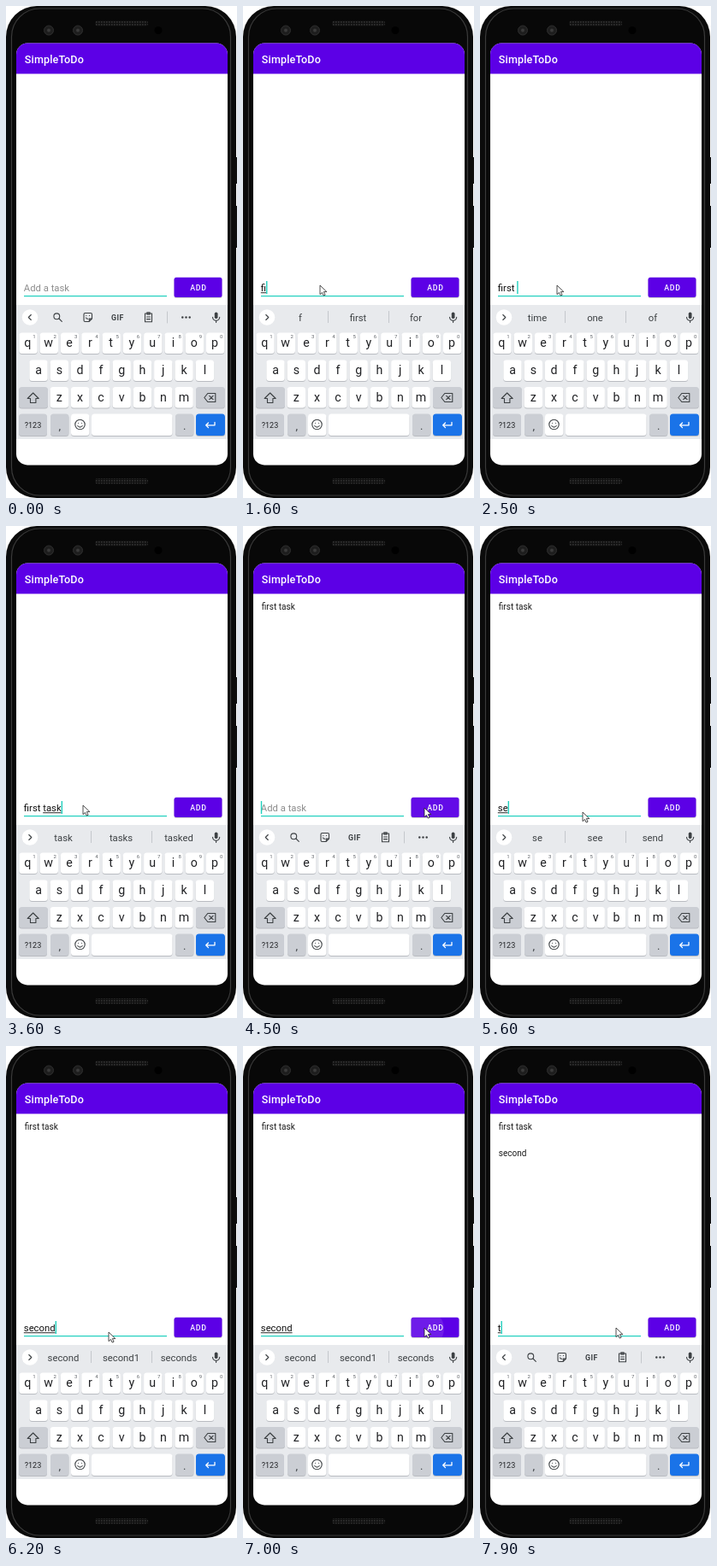
Recreate the animation shown at these times as an HTML page. Size 270 by 576 pixels, loop 8000 ms.

```html
<!DOCTYPE html>
<html lang="en">
<head>
<meta charset="utf-8">
<title>SimpleToDo</title>
<style>
html, body { margin: 0; width: 100%; height: 100%; overflow: hidden; background: #fff; }
svg { display: block; width: 270px; height: 576px; font-family: Roboto, sans-serif; }
.mid { text-anchor: middle; }
.icon { fill: none; stroke: #3c4043; stroke-width: 1.1; stroke-linecap: round; stroke-linejoin: round; }
.solid { fill: #3c4043; stroke: none; }
.item { font-size: 10.06px; fill: #1c1c1c; }
.entry { font-size: 11.3px; white-space: pre; }
</style>
</head>
<body>
<svg viewBox="0 0 270 576">
  <defs>
    <clipPath id="buttonClip"><rect x="196.500" y="317.700" width="56" height="23.300" rx="2.500"/></clipPath>
    <clipPath id="screenClip"><rect x="12" y="43.600" width="247" height="493.800" rx="13"/></clipPath>
    <pattern id="mesh" width="3" height="3" patternUnits="userSpaceOnUse">
      <rect width="3" height="3" fill="#101010"/><rect width="1.6" height="1.6" fill="#333"/>
    </pattern>
  </defs>

  <!-- phone -->
  <path d="M267.500 177h2.500v31h-2.500zM267.500 234h2.500v49h-2.500z" fill="#111"/>
  <rect x="0" y="0" width="269" height="576" rx="36" fill="#0b0b0b"/>
  <rect x="6.500" y="3" width="256" height="570" rx="33" fill="#080808" stroke="#3a3a3a" stroke-width="1.200"/>
  <rect x="104" y="17" width="62" height="6.500" rx="3" fill="url(#mesh)"/>
  <rect x="104" y="553" width="62" height="6.500" rx="3" fill="url(#mesh)"/>
  <g fill="#1e1e1e" stroke="#2e2e2e">
    <circle cx="50" cy="28.500" r="5.500"/><circle cx="84" cy="28.500" r="5.500"/>
  </g>
  <circle cx="50" cy="28.500" r="2" fill="#3a3a3a"/><circle cx="84" cy="28.500" r="2" fill="#3a3a3a"/>
  <circle cx="178" cy="28.500" r="4.500" fill="#000"/>

  <!-- app -->
  <g clip-path="url(#screenClip)">
    <rect x="12" y="43" width="247" height="495" fill="#fff"/>
    <rect x="12" y="43" width="247" height="36.400" fill="#5c00e6"/>
    <text x="21.800" y="66.500" font-size="12.570" font-weight="500" letter-spacing=".157" fill="#fff">SimpleToDo</text>
    <text id="item1" class="item" x="21.800" y="98.300">first task</text>
    <text id="item2" class="item" x="21.800" y="128.500">second</text>

    <rect x="21" y="339" width="167" height="1.200" fill="#1fcfbd"/>
    <text id="hint" class="entry" x="20.800" y="334" fill="#8c8c8c">Add a task</text>
    <text id="entry" class="entry" x="20.800" y="334" fill="#111"></text>
    <rect id="under" y="335.300" height=".9" fill="#111"/>
    <rect id="caret" y="322" width="1.400" height="15" fill="#1fcfbd"/>

    <rect x="196.500" y="318.700" width="56" height="23.300" rx="2.500" fill="#000" opacity=".2"/>
    <rect x="196.500" y="317.700" width="56" height="23.300" rx="2.500" fill="#5c00e6"/>
    <g clip-path="url(#buttonClip)"><circle id="ripple" cx="213" cy="331" fill="#fff"/></g>
    <text class="mid" x="225" y="332.800" font-size="8.800" font-weight="500" letter-spacing=".78" fill="#fff">ADD</text>

    <rect x="12" y="350" width="247" height="157" fill="#e8eaed"/>
    <circle cx="28" cy="364.500" r="9.300" fill="#fff"/>
    <path id="chevron" class="icon"/>
    <g id="tools" class="icon">
      <circle cx="59.300" cy="363.300" r="3.400"/><path d="M62 366l3.300 3.400"/>
      <path d="M92.500 359.500h6.500a1.500 1.500 0 0 1 1.500 1.500v5l-3.500 3.500h-4.500a1.500 1.500 0 0 1-1.500-1.500v-7a1.500 1.500 0 0 1 1.500-1.500zM97.300 369.300v-3.200h3.200M93.500 365q1 1.500 2.300 1.300M93.800 362.500h.1M97.500 362.500h.1"/>
      <text class="mid solid" x="130.500" y="367.700" font-size="8.800" font-weight="700" letter-spacing=".5">GIF</text>
      <path d="M162.500 360h8v9.700h-8zM164.800 358.800h3.400v2.200h-3.400zM164.500 364h4M164.500 366.600h4"/>
      <path d="M188.500 358v13" stroke="#c4c7cc" stroke-width="1"/>
      <g class="solid"><circle cx="206.300" cy="364.500" r="1.200"/><circle cx="210.500" cy="364.500" r="1.200"/><circle cx="214.700" cy="364.500" r="1.200"/></g>
    </g>
    <g id="words" font-size="11.300" fill="#3c4043">
      <path d="M99.500 357v14M170.500 357v14" stroke="#c4c7cc"/>
      <text class="mid" x="67" y="368.800"></text>
      <text class="mid" x="134.500" y="368.800"></text>
      <text class="mid" x="202" y="368.800"></text>
    </g>
    <rect class="solid" x="243.800" y="358.500" width="3.700" height="7.500" rx="1.850"/>
    <path class="icon" d="M241.500 364.300q.4 4 4.100 4t4.100-4M245.600 368.300v2.200"/>
    <g id="keys"></g>
    <g class="icon">
      <path d="M31.700 453l6.500 6.500h-3.300v5h-6.400v-5h-3.300z"/>
      <path d="M235.800 453.500h9v10h-9l-4-5zM237.700 456.300l4.400 4.400M242.100 456.300l-4.400 4.400"/>
      <circle cx="86.500" cy="490" r="5.700"/><path d="M83.700 491.500q2.800 3.200 5.600 0M84.500 488.200h.1M88.500 488.200h.1"/>
      <path d="M244 487.500v3.300h-10.300M236.500 488l-2.800 2.800 2.800 2.800" stroke="#fff" stroke-width="1.300"/>
    </g>
  </g>
  <path id="mouse" d="M0 0v10.700l2.500-2.300 1.700 3.700 1.900-.9-1.700-3.600h3.500z" fill="#fff" stroke="#222" stroke-width=".8" stroke-linejoin="round"/>
</svg>
<script>
const LOOP = 8000, TICK = 100;
const $ = id => document.getElementById(id);
const NS = 'http://www.w3.org/2000/svg';

function add(parent, tag, attrs, text = '') {
  const el = document.createElementNS(NS, tag);
  for (const k in attrs) el.setAttribute(k, attrs[k]);
  el.textContent = text;
  parent.append(el);
}

function key(x, y, w, h, fill = '#fff') {
  const box = { x, width: w, height: h, rx: 3.5 };
  add($('keys'), 'rect', { ...box, y: y + .9, fill: '#b9bcc1' });
  add($('keys'), 'rect', { ...box, y, fill });
}

function label(x, y, size, text, fill = '#202124') {
  add($('keys'), 'text', { class: 'mid', x, y, 'font-size': size, fill }, text);
}

[['qwertyuiop', 26, 382.5], ['asdfghjkl', 38, 414.5], ['zxcvbnm', 62.3, 446]].forEach(([row, x0, y], r) => {
  [...row].forEach((ch, i) => {
    const x = x0 + i * 24.3;
    key(x - 10.7, y, 21.4, 24.5);
    label(x - (r ? 0 : .6), y + 16.6, 14.2, ch);
    if (!r) label(x + 7, y + 6.6, 6, (i + 1) % 10, '#5f6368');
  });
});
const GREY = '#cbced4';
key(15, 446, 34, 24.5, GREY);
key(222, 446, 34, 24.5, GREY);
key(15, 477.5, 33, 25.5, GREY);
key(52, 477.5, 21.4, 25.5, GREY);
key(76, 477.5, 21.4, 25.5);
key(100, 477.5, 94.5, 25.5);
key(198, 477.5, 21.4, 25.5, GREY);
key(222, 477.5, 34, 25.5, '#1a73e8');
label(31.5, 493.5, 9, '?123');
label(62.7, 496, 13, ',', '#3c4043');
label(208.7, 495.5, 13, '.', '#3c4043');

// time, typed text, suggestions (none: toolbar)
const typing = [
  [-800, ''],
  [1400, 'f'],
  [1600, 'fi', 'f first for'],
  [1800, 'fir', 'fir first fire'],
  [2000, 'firs', 'firs first firsts'],
  [2200, 'first', 'first firsts firstly'],
  [2400, 'first ', 'time one of'],
  [2700, 'first t', 't to the'],
  [2900, 'first ta', 'ta take talk'],
  [3100, 'first tas', 'tas task tasks'],
  [3400, 'first task', 'task tasks tasked'],
  [4200, ''],
  [5400, 's', 's so see'],
  [5600, 'se', 'se see send'],
  [5700, 'sec', 'sec second secret'],
  [5900, 'seco', 'seco second seconds'],
  [6000, 'secon', 'secon second seconds'],
  [6100, 'second', 'second second1 seconds'],
  [7100, ''],
  [7900, 't'],
];

// time, x, y of the pointer tip
const path = [
  [100, 252, 490], [500, 140, 376], [900, 90, 327], [3700, 90, 327],
  [4100, 212, 330], [4500, 212, 330], [5000, 120, 335], [6300, 120, 335],
  [6800, 212, 330], [7200, 212, 330], [7600, 159, 330], [8000, 159, 330],
];
const clicks = [4100, 6900];

function pointer(t) {
  const i = Math.max(1, path.findIndex(p => p[0] > t));
  const [t0, x0, y0] = path[i - 1], [t1, x1, y1] = path[i];
  const u = Math.max(0, (t - t0) / (t1 - t0)), e = u * u * (3 - 2 * u);
  return [x0 + (x1 - x0) * e, y0 + (y1 - y0) * e];
}

const show = (id, on) => $(id).style.display = on ? '' : 'none';

function draw(t) {
  const [since, text, words] = typing.findLast(s => s[0] <= t);
  $('entry').textContent = text;
  show('hint', !text);
  show('tools', !words);
  show('words', words);
  if (words) {
    const slots = $('words').querySelectorAll('text');
    words.split(' ').forEach((w, i) => slots[i].textContent = w);
  }
  $('chevron').setAttribute('d', words ? 'M26.8 361.5l3 3-3 3' : 'M29.3 361.5l-3 3 3 3');

  const end = text ? $('entry').getComputedTextLength() : 0;
  const start = text.lastIndexOf(' ') + 1;
  const left = text && start ? $('entry').getSubStringLength(0, start) : 0;
  $('under').setAttribute('x', 20.8 + left);
  $('under').setAttribute('width', Math.max(0, end - left));
  $('caret').setAttribute('x', 20.8 + end);
  show('caret', (t - since) % 1000 < 500);

  show('item1', t >= 4200);
  show('item2', t >= 7100);

  const age = t - (clicks.findLast(c => c <= t) ?? -LOOP);
  $('ripple').setAttribute('r', Math.min(45, 8 + age * .14));
  $('ripple').setAttribute('opacity', Math.max(0, .13 * (1 - age / 600)));

  const [x, y] = pointer(t);
  show('mouse', t >= 100);
  $('mouse').setAttribute('transform', `translate(${x.toFixed(1)} ${y.toFixed(1)})`);
}

let shown = -1;
const origin = performance.now();
function frame() {
  const t = Math.floor((performance.now() - origin) % LOOP / TICK) * TICK;
  if (t !== shown) draw(shown = t);
  requestAnimationFrame(frame);
}
frame();
</script>
</body>
</html>
```
